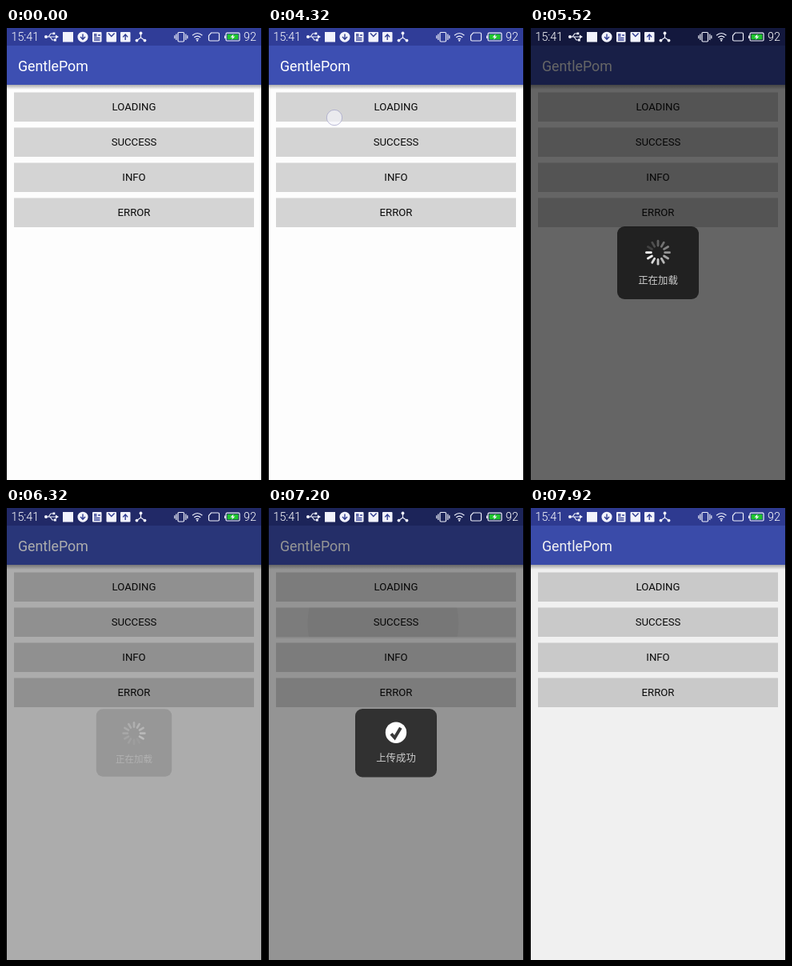
These frames come from a looping animation (320x565 px, 8 s). An HTML page:

```html
<!DOCTYPE html>
<html lang="en">
<head>
<meta charset="utf-8">
<title>Progress dialog demo</title>
<style>
  html, body { margin: 0; width: 100%; height: 100%; overflow: hidden; background: #000; }
  svg { display: block; width: 100vw; height: 100vh; }
  text { font-family: Roboto, "Noto Sans", sans-serif; }
  .btn { font-size: 13.2px; fill: #0c0c0c; text-anchor: middle; }
  .msg { font: 12.4px "Noto Sans CJK SC", "Noto Sans CJK", sans-serif; fill: #ccc; text-anchor: middle; }
  .clock { font-size: 14.3px; font-weight: 300; fill: #fff; }
  .line { fill: none; stroke: #eef0fb; stroke-width: 1.2; }
  .cut { fill: none; stroke: #303d92; stroke-width: 1.4; }
  .solid { fill: #f2f3fc; }
</style>
</head>
<body>
<svg id="stage" viewBox="0 0 320 565" preserveAspectRatio="none">
  <defs>
    <linearGradient id="shade" x2="0" y2="1">
      <stop offset="0" stop-color="#000" stop-opacity=".32"/>
      <stop offset="1" stop-color="#000" stop-opacity="0"/>
    </linearGradient>
  </defs>

  <rect width="320" height="565" fill="#fdfdfd"/>
  <rect y="71" width="320" height="6" fill="url(#shade)"/>
  <rect width="320" height="71" fill="#3d4fb2"/>
  <rect width="320" height="22" fill="#303d98"/>
  <text x="15" y="54" font-size="17.8" fill="#fff">GentlePom</text>
  <g id="buttons"></g>
  <circle id="touch" r="9.7" fill="#f4f4fa" fill-opacity=".85" stroke="#a9a9cc" stroke-width="1"/>
  <rect id="dim" width="320" height="565"/>

  <g id="loading">
    <rect x="109" y="248" width="102" height="91" rx="9" fill-opacity=".67"/>
    <g id="spokes"></g>
    <text class="msg" x="160" y="319.7">正在加载</text>
  </g>
  <g id="success">
    <rect x="109" y="251" width="102" height="85.5" rx="9" fill-opacity=".67"/>
    <circle cx="160" cy="280.7" r="13.2" fill="#fff"/>
    <path d="M154 282.2l4.4 5 7.4-12.4" fill="none" stroke="#383838" stroke-width="4"/>
    <text class="msg" x="160" y="317">上传成功</text>
  </g>

  <g id="status">
    <text class="clock" x="6.5" y="16.3">15:41</text>
    <path class="line" d="M50 11h13M53 11l3-4h3M55 11l3 4h3"/>
    <path class="solid" d="M62 8.6l4 2.4-4 2.4zM58.5 5.5h2.8v2.8h-2.8zM60 13.6h2.8v2.8h-2.8z"/>
    <circle class="solid" cx="50" cy="11" r="2"/>
    <rect class="solid" x="71" y="5" width="13" height="12.5"/>
    <circle class="solid" cx="96" cy="11.2" r="6.5"/>
    <path class="cut" d="M96 7.5v6M93 11l3 3.2 3-3.2"/>
    <rect class="solid" x="108" y="5" width="11.5" height="12.5" rx="1"/>
    <path class="cut" d="M110 8h3.5M110 10h3.5M115 9h3M110 12.5h7.5M110 15h7.5" stroke-width="1.2"/>
    <rect class="solid" x="125.5" y="5" width="12.5" height="12.5" rx="1"/>
    <path class="cut" d="M128 6.5l3.8 4 3.8-4"/>
    <rect class="solid" x="143" y="5" width="12.5" height="12.5" rx="1"/>
    <path class="cut" d="M149.2 15V9M146.2 11.4l3-3.4 3 3.4" stroke-width="1.8"/>
    <path class="line" d="M168.5 7v5l-5 3.5M168.5 12l5 3.5" stroke-width="1.5"/>
    <g class="solid">
      <circle cx="168.5" cy="6.5" r="1.9"/><circle cx="163.5" cy="15.6" r="1.9"/><circle cx="173.5" cy="15.6" r="1.9"/>
    </g>
    <rect class="line" x="215" y="5.5" width="7.5" height="11.5" rx="1.2"/>
    <path class="line" d="M212.8 7.5v7.5M224.8 7.5v7.5M210.8 9.2v4M226.8 9.2v4"/>
    <path class="line" d="M233 9.2q6.2-5.4 12.4 0M235.2 11.8q4-3.4 8 0M237.3 14q1.9-1.5 3.8 0" stroke-width="1.5"/>
    <circle class="solid" cx="239.2" cy="15.7" r="1.1"/>
    <path class="line" d="M256.5 6h8.5q1.5 0 1.5 1.5v7q0 1.500-1.500 1.500h-10q-1.500 0-1.500-1.500v-5z"/>
    <rect class="line" x="275" y="6.2" width="17" height="9.800" rx="1.200"/>
    <path class="solid" d="M273 9.500h1.500v3.500h-1.500z"/>
    <rect x="276.600" y="7.800" width="13.800" height="6.600" fill="#1fc52e"/>
    <path class="solid" d="M284.500 7.500l-4 4.300h2.500l-.8 3 4.200-4.400h-2.600z"/>
    <text class="clock" x="297" y="16.300">92</text>
  </g>
  <path d="M0 0h1v565h-1zM319 0h1v565h-1z"/>
</svg>

<script>
const LOOP = 8000, STEP = 80;
const $ = id => document.getElementById(id);

function add(parent, tag, attrs, text) {
  const el = document.createElementNS("http://www.w3.org/2000/svg", tag);
  set(el, attrs);
  if (text) el.textContent = text;
  return parent.appendChild(el);
}
function set(el, attrs) {
  for (const key in attrs) el.setAttribute(key, attrs[key]);
}
const clamp = v => Math.max(0, Math.min(1, v));

// Linear value along [time, value] points
function track(points, t) {
  if (t <= points[0][0]) return points[0][1];
  for (let i = 1; i < points.length; i++) {
    const [t0, a] = points[i - 1], [t1, b] = points[i];
    if (t < t1) return a + (b - a) * (t - t0) / (t1 - t0);
  }
  return points[points.length - 1][1];
}

const buttons = ["LOADING", "SUCCESS", "INFO", "ERROR"].map((label, i) => {
  const y = 80.5 + 44 * i, g = $("buttons");
  const box = { x: 10, y, width: 300, height: 36.5 };
  const clip = add(document.querySelector("defs"), "clipPath", { id: "clip" + i });
  add(clip, "rect", box);
  const shadow = add(g, "rect", { ...box, y: y + 1.8, opacity: 0 });
  add(g, "rect", { ...box, fill: "#d4d4d4" });
  const layer = add(g, "g", { "clip-path": `url(#clip${i})` });
  const ripple = add(layer, "circle", { r: 0, opacity: 0 });
  add(g, "text", { class: "btn", x: 160, y: y + 22.7 }, label);
  return { shadow, ripple, cy: y + 18.2 };
});

const spokes = Array.from({ length: 12 }, (_, i) => add($("spokes"), "line", {
  x1: 160, x2: 160, y1: 272, y2: 266.2, stroke: "#fff", "stroke-width": 2.8,
  "stroke-linecap": "round", transform: `rotate(${30 * i} 160 280.7)`
}));

const presses = [
  { button: 0, at: 4320, x: 83, y: 112 },
  { button: 1, at: 6720, x: 117, y: 147 }
];
const dimTrack = [
  [4560, 0], [4640, .05], [4880, .6], [6160, .6], [6240, .48], [6480, 0],
  [6960, 0], [7040, .05], [7280, .6], [7520, .6], [7600, .55], [7920, .05], [8000, 0]
];
const loadingTrack = [
  [4560, 0], [4640, .56], [4800, 1], [6160, 1], [6240, .55], [6320, .18], [6400, 0]
];
const successTrack = [
  [6960, 0], [7040, .56], [7200, 1], [7520, 1], [7600, .68], [7680, .3], [7760, 0]
];
const touchTrack = [
  [79, 0], [80, 1], [4240, 1], [4320, .8], [4480, 0],
  [6719, 0], [6720, 1], [6800, 1], [6960, 0]
];

function drawPress({ button, at, x, y }, t) {
  const { ripple, shadow, cy } = buttons[button];
  const grow = clamp((t - at) / 768);
  const fade = t < at ? 0 : clamp((at + 560 - t) / 160);
  set(ripple, {
    cx: x + (160 - x) * grow, cy: y + (cy - y) * grow,
    r: 151 * grow, opacity: .085 * fade
  });
  set(shadow, { opacity: .16 * fade * clamp((t - at) / 160) });
}

function drawDialog(id, alpha, cy) {
  const s = .91 + .09 * alpha;
  set($(id), { opacity: alpha, transform: `translate(160 ${cy}) scale(${s}) translate(-160 ${-cy})` });
}

function render(time) {
  const t = Math.floor(time % LOOP / STEP) * STEP;
  presses.forEach(p => drawPress(p, t));
  const { x, y } = presses[t < 6000 ? 0 : 1];
  set($("touch"), { cx: x, cy: y, opacity: track(touchTrack, t) });
  set($("dim"), { opacity: track(dimTrack, t) });
  drawDialog("loading", track(loadingTrack, t), 293.5);
  drawDialog("success", track(successTrack, t), 293.75);

  // The brightest spoke moves one place clockwise per step
  const head = 9 + (Math.min(t, 6080) - 5520) / STEP;
  spokes.forEach((el, i) => {
    const age = ((head - i) % 12 + 12) % 12;
    set(el, { opacity: Math.max(.14, 1 - age * .08) });
  });
}

const start = performance.now();
function tick() {
  render(performance.now() - start);
  requestAnimationFrame(tick);
}
tick();
</script>
</body>
</html>
```
